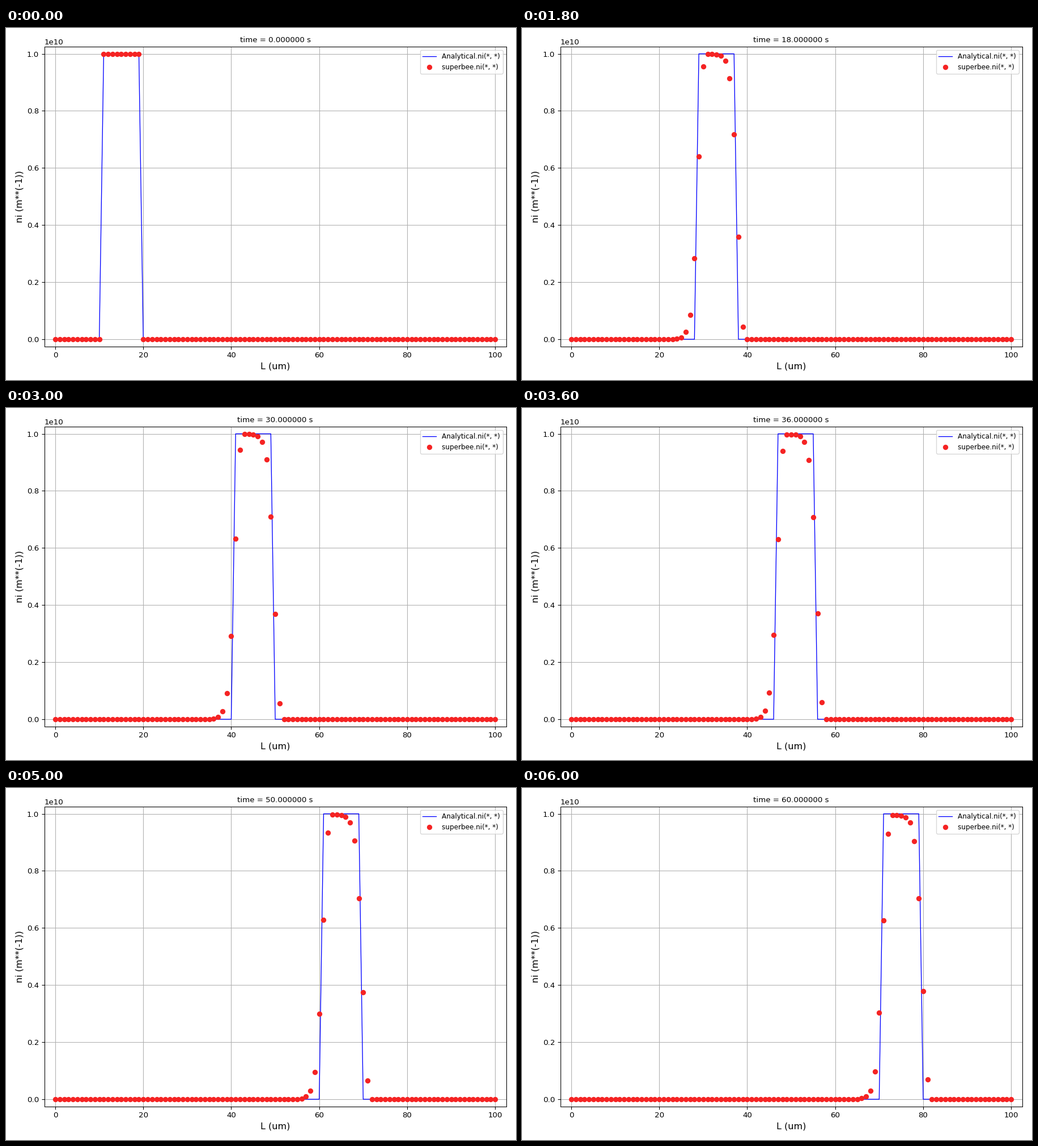
Recreate the animation shown at these times as a matplotlib script. Size 900 by 622 pixels, loop 6.2 s.

```python
import numpy as np
import matplotlib.pyplot as plt
from matplotlib.animation import FuncAnimation

W, H, DPI = 900, 622, 96
FRAMES, INTERVAL = 31, 200
STEP = 2.0      # simulated seconds per frame
SUB = 80        # solver steps per frame
PEAK = 1e10

plt.rcParams["font.family"] = "DejaVu Sans"

x = np.arange(101)


def pulse(t):
    """Square pulse carried along at one cell per second."""
    return np.where((x > 10 + t) & (x < 20 + t), 1.0, 0.0)


def minmod(a, b):
    return np.where(a * b > 0, np.sign(a) * np.minimum(abs(a), abs(b)), 0.0)


def rate(f):
    """Upwind advection rate with superbee-limited slopes."""
    d = np.diff(f, prepend=0.0, append=f[-1])
    back, ahead = d[:-1], d[1:]
    s1 = minmod(2 * back, ahead)
    s2 = minmod(back, 2 * ahead)
    flux = f + 0.5 * np.where(abs(s1) > abs(s2), s1, s2)
    return -np.diff(flux, prepend=0.0)


def advance(f):
    dt = STEP / SUB
    for _ in range(SUB):
        g = f + dt * rate(f)
        f = 0.5 * (f + g + dt * rate(g))
    return f


states = [pulse(0)]
for _ in range(FRAMES - 1):
    states.append(advance(states[-1]))

fig = plt.figure(figsize=(W / DPI, H / DPI), dpi=DPI, facecolor="white")
left, top, width, height = 67.6, 33.0, 815.0, 529.6
ax = fig.add_axes([left / W, 1 - (top + height) / H, width / W, height / H])
ax.set_xlim(-2.5, 102.5)
ax.set_ylim(-0.025 * PEAK, 1.025 * PEAK)
ax.grid(True)
ax.set_xlabel("L (um)", fontsize=12)
ax.set_ylabel("ni (m**(-1))", fontsize=12)
title = ax.set_title("", fontsize=10)

exact, = ax.plot(x, pulse(0) * PEAK, color="b", lw=1,
                 label="Analytical.ni(*, *)")
dots, = ax.plot(x, states[0] * PEAK, "o", color="#f52323", ms=6,
                label="superbee.ni(*, *)")
ax.legend(loc="upper right", fontsize=9)


def draw(i):
    t = i * STEP
    exact.set_ydata(pulse(t) * PEAK)
    dots.set_ydata(states[i] * PEAK)
    title.set_text(f"time = {t:.6f} s")
    return exact, dots, title


anim = FuncAnimation(fig, draw, frames=FRAMES, interval=INTERVAL, repeat=True)
plt.show()
```
